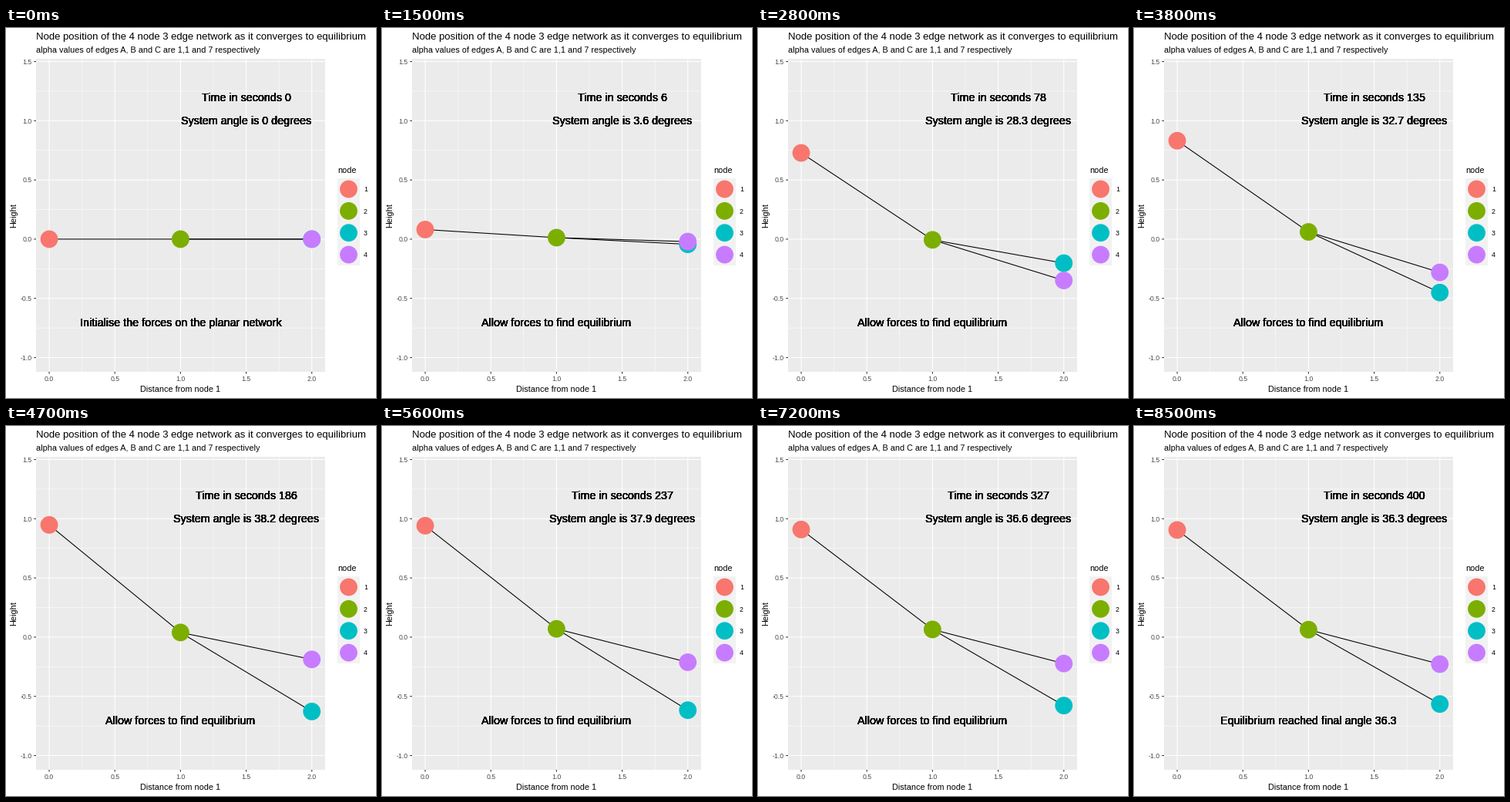
Recreate the animation shown at these times as a matplotlib script. Size 480 by 480 pixels, loop 10 s.

```python
import numpy as np
import matplotlib.pyplot as plt
from matplotlib.animation import FuncAnimation
from matplotlib.patches import Circle, Rectangle

plt.rcParams["font.family"] = "Liberation Sans"

SIZE, DPI = 480, 72
FRAMES, HOLD, STEPS = 100, 14, 71
LAST_TIME = 400
COLORS = ["#F8766D", "#7CAE00", "#00BFC4", "#C77CFF"]
NODE_X = [0, 1, 2, 2]
RADIUS = 11.4
LEFT, TOP, RIGHT, BOTTOM = 39, 40.4, 413.8, 445.9

# Spring network: node 2 is the hub joined to nodes 1, 3 and 4.
OUTER = [0, 2, 3]
GRAVITY, FRICTION = 0.00383, 0.0177
LOAD = GRAVITY * np.array([1, 0, -0.5, -0.5])
STIFFNESS = np.array([0.01936, 0.0199, 0.165])

# Heights the network passes through: time, then nodes 1 to 4.
WAYPOINTS = np.array([
    [0, 0, 0, 0, 0],
    [33, 1.321, 0.031, -0.833, -0.358],
    [78, 0.728, -0.006, -0.203, -0.349],
    [135, 0.831, 0.061, -0.451, -0.281],
    [237, 0.941, 0.070, -0.617, -0.212],
    [327, 0.909, 0.065, -0.578, -0.223],
    [400, 0.905, 0.063, -0.565, -0.228],
])


def px(x):
    return 56.03 + 170.35 * x


def py(y):
    return 273.9 - 153.6 * y


def simulate(substeps=10):
    """Heights of the four nodes at every whole second."""
    dt = 1 / substeps
    height, speed = np.zeros(4), np.zeros(4)
    path = [height.copy()]
    for _ in range(LAST_TIME):
        for _ in range(substeps):
            rise = height[OUTER] - height[1]
            pull = STIFFNESS * rise * (1 - 1 / np.sqrt(1 + rise**2))
            force = LOAD - FRICTION * speed
            force[OUTER] -= pull
            force[1] += pull.sum()
            speed += force * dt
            height += speed * dt
        path.append(height.copy())
    return np.array(path)


def settle_path():
    """Simulated motion, eased so that it meets the waypoints."""
    path = simulate()
    seconds = np.arange(LAST_TIME + 1)
    times = WAYPOINTS[:, 0].astype(int)
    gap = WAYPOINTS[:, 1:] - path[times]
    for node in range(4):
        path[:, node] += np.interp(seconds, times, gap[:, node])
    return path


PATH = settle_path()

fig = plt.figure(figsize=(SIZE / DPI, SIZE / DPI), dpi=DPI, facecolor="white")
ax = fig.add_axes([0, 0, 1, 1])
ax.set_xlim(0, SIZE)
ax.set_ylim(SIZE, 0)
ax.axis("off")


def line(xs, ys, color, width, z):
    return ax.plot(xs, ys, color=color, lw=width, zorder=z, snap=False,
                   solid_capstyle="butt")[0]


def label(x, y, text, size, color="black", **kw):
    return ax.text(x, y, text, fontsize=size, color=color, va="baseline", **kw)


def box(x, y, w, h, color):
    ax.add_patch(Rectangle((x, y), w, h, fc=color, ec="none", lw=0, zorder=0))


def dot(x, y, color, z=5):
    return ax.add_patch(Circle((x, y), RADIUS, fc=color, ec="none", lw=0, zorder=z))


def draw_panel():
    box(LEFT, TOP, RIGHT - LEFT, BOTTOM - TOP, "#EBEBEB")
    for x in np.arange(0, 2.01, 0.25):
        major = x % 0.5 == 0
        line([px(x)] * 2, [TOP, BOTTOM], "white", 1.07 if major else 0.53, 1 + major)
        if major:
            line([px(x)] * 2, [BOTTOM, BOTTOM + 2.75], "#333333", 1.07, 2)
            label(px(x), 458, f"{x:.1f}", 8.8, "#4D4D4D", ha="center")
    for y in np.arange(-1, 1.51, 0.25):
        major = y % 0.5 == 0
        line([LEFT, RIGHT], [py(y)] * 2, "white", 1.07 if major else 0.53, 1 + major)
        if major:
            line([LEFT - 2.75, LEFT], [py(y)] * 2, "#333333", 1.07, 2)
            label(34, py(y) + 3.2, f"{y:.1f}", 8.8, "#4D4D4D", ha="right")


def draw_titles():
    label(39, 15, "Node position of the 4 node 3 edge network"
                  " as it converges to equilibrium", 13.1)
    label(39, 32, "alpha values of edges A, B and C are 1,1 and 7 respectively", 10.9)
    label(226, 472, "Distance from node 1", 10.9, ha="center")
    label(13, 243, "Height", 10.9, ha="center", rotation=90, rotation_mode="anchor")


def draw_legend():
    key = 28.35
    label(430, 188, "node", 10.9)
    for i, color in enumerate(COLORS):
        y = 209 + i * key
        box(430.3, y - key / 2, key, key, "#F2F2F2")
        dot(444.5, y, color)
        label(464, y + 3.2, str(i + 1), 8.8)


def heavy_text(x, y, copies=8):
    """Stacked copies thicken the antialiased glyph edges."""
    return [label(px(x), py(y) + 5.1, "", 14.2, ha="center", zorder=8)
            for _ in range(copies)]


draw_panel()
draw_titles()
draw_legend()
edges = [line([px(1), px(NODE_X[i])], [py(0)] * 2, "black", 1.07, 4) for i in OUTER]
nodes = [dot(px(x), py(0), c, 5 + i / 10)
         for i, (x, c) in enumerate(zip(NODE_X, COLORS))]
time_text, angle_text, stage_text = (
    heavy_text(1.5, 1.2), heavy_text(1.5, 1.0), heavy_text(1.0, -0.7))


def write(copies, text):
    for item in copies:
        item.set_text(text)


def update(frame):
    step = min(max(frame - HOLD, 0), STEPS)
    seconds = min(3 * round(step * 134 / STEPS), LAST_TIME)
    height = PATH[seconds]
    for node, x, y in zip(nodes, NODE_X, height):
        node.center = (px(x), py(y))
    for edge, i in zip(edges, OUTER):
        edge.set_ydata([py(height[1]), py(height[i])])

    angle = np.degrees(np.arctan(np.ptp(height) / 2))
    angle = f"{round(angle, 1):g}"
    if step == 0:
        stage = "Initialise the forces on the planar network"
    elif step == STEPS:
        stage = f"Equilibrium reached final angle {angle}"
    else:
        stage = "Allow forces to find equilibrium"
    write(time_text, f"Time in seconds {seconds}")
    write(angle_text, f"System angle is {angle} degrees")
    write(stage_text, stage)
    return [*edges, *nodes, *time_text, *angle_text, *stage_text]


anim = FuncAnimation(fig, update, frames=FRAMES, interval=100,
                     repeat=True, repeat_delay=0, blit=False)
plt.show()
```
